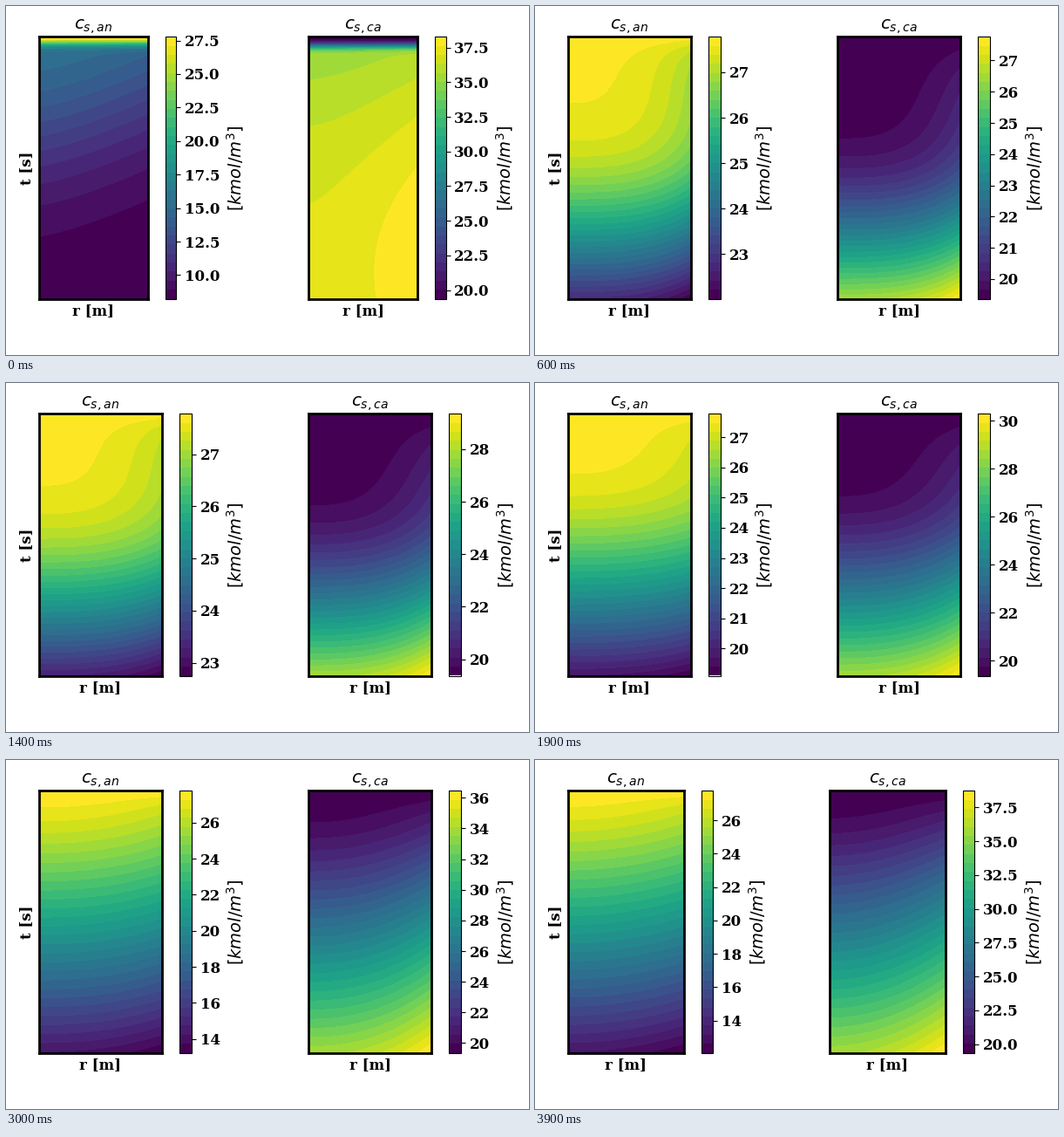
A matplotlib script for the animation above (4000 ms loop, 600 by 400 pixels).

```python
import numpy as np
import matplotlib.pyplot as plt
from matplotlib.animation import FuncAnimation
from matplotlib.ticker import MaxNLocator

W, H, DPI = 600, 400, 100
FRAMES, STEP = 40, 100
TOP, BOTTOM, LEFT, LEFT2 = 35.2, 335.5, 37.8, 347
LEVELS = 30

plt.rcParams.update({"font.family": "DejaVu Serif", "font.size": 12})

# Radius across, time downwards; rows are denser near the start.
X, Y = np.meshgrid(np.linspace(0, 1, 70), np.linspace(0, 1, 180) ** 1.5)

# Key points of the training progress.
KEYS = (0, 6, 10, 13, 19, 25, 30, 39)
DROP = (19.54, 5.76, 4.73, 4.3, 8.68, 10.83, 14.55, 15.71)
GAIN = (18.92, 8.4, 9.29, 9.8, 10.94, 11.92, 17.11, 19.39)
AN_ONSET = (.48, .48, .49, .46, .34, .24, .06, .05)
CA_ONSET = (.5, .5, .48, .45, .39, .36, .13, .1)


def ramp(onset, soft):
    """Flat at first, then linear; runs from 0 to 1."""
    def soft_plus(y):
        return np.logaddexp(0, (y - onset) / soft)
    start = soft_plus(0)
    return (soft_plus(Y) - start) / (soft_plus(1) - start)


def trained(onset, soft, edge, creep, settle, bend):
    """Ramp in time plus a radial profile that settles quickly."""
    profile = edge * (X ** bend + creep) * (1 - np.exp(-Y / settle))
    return (1 - edge * (1 + creep)) * ramp(onset, soft) + profile


def jump(width, power):
    return 1 - np.exp(-(Y / width) ** power)


def untrained_anode():
    slow = 1 - np.exp(-((Y + 0.14 * X ** 1.3) / 0.5) ** 2)
    v = jump(0.03, 2) * (0.63 + 0.37 * slow)
    return v / v.max()


def untrained_cathode():
    hill = 0.117 * (1 - ((Y - 0.85) / 0.85) ** 2)
    side = X ** 1.6 * (0.03 + 0.035 * Y)
    v = jump(0.04, 3) * (0.82 + hill + side)
    return v / v.max()


AN_START, CA_START = untrained_anode(), untrained_cathode()


def solution(i):
    """Anode and cathode concentrations for one step of the loop."""
    t = 6 * (1 - (1 - i / 6) ** 3) if i < 6 else i

    def at(values):
        return np.interp(t, KEYS, values)

    raw = max(0, 1 - t / 6)
    bend = np.interp(t, (6, 39), (3, 2))
    soft = np.interp(t, (6, 39), (0.085, 0.065))
    edge = np.interp(t, (10, 19), (0.13, 0.065))
    an = trained(at(AN_ONSET), soft, edge, 0.2, 0.05, bend)
    ca = trained(at(CA_ONSET), soft, 0.15, 0, 0.2, bend)
    an = raw * AN_START + (1 - raw) * an
    ca = raw * CA_START + (1 - raw) * ca
    return 27.78 - at(DROP) * an, 19.37 + at(GAIN) * ca


def ticks():
    return MaxNLocator(9, steps=[1, 2, 2.5, 5, 10])


def has_decimals(c):
    gap = np.diff(ticks().tick_values(c.min(), c.max()))[0]
    return int(abs(gap - round(gap)) > 1e-6)


def add_axes(x, width):
    return fig.add_axes([x / W, 1 - BOTTOM / H, width / W, (BOTTOM - TOP) / H])


def panel(x, width, c, name):
    ax = add_axes(x, width)
    levels = np.linspace(c.min(), c.max(), LEVELS)
    half = (levels[1] - levels[0]) / 2
    cs = ax.contourf(X, Y, c, levels, cmap="viridis",
                     vmin=levels[0] + half, vmax=levels[-1] - half)
    ax.set(xlim=(0, 1), ylim=(1, 0), xticks=[], yticks=[])
    ax.set_xlabel("r [m]", weight="bold")
    ax.set_title(f"$c_{{s,{name}}}$")
    for spine in ax.spines.values():
        spine.set_linewidth(2)
    bar = fig.colorbar(cs, cax=add_axes(x + width + 20, 0.1 * width),
                       ticks=ticks(), spacing="proportional")
    bar.minorticks_off()
    bar.set_label("$[kmol/m^3]$", fontsize=14)
    for label in bar.ax.get_yticklabels():
        label.set_weight("bold")
    return ax


def draw(i):
    fig.clear()
    an, ca = solution(i)
    dec_an, dec_ca = has_decimals(an), has_decimals(ca)
    # Wider tick labels leave less room for the plots.
    width = 141 - 8 * (dec_an + dec_ca)
    panel(LEFT, width, an, "an").set_ylabel("t [s]", weight="bold")
    panel(LEFT2 + 9 * (dec_an - dec_ca), width, ca, "ca")
    return []


fig = plt.figure(figsize=(W / DPI, H / DPI), dpi=DPI, facecolor="white")
anim = FuncAnimation(fig, draw, frames=FRAMES, interval=STEP,
                     init_func=lambda: [], repeat=True, repeat_delay=0)
plt.show()
```
